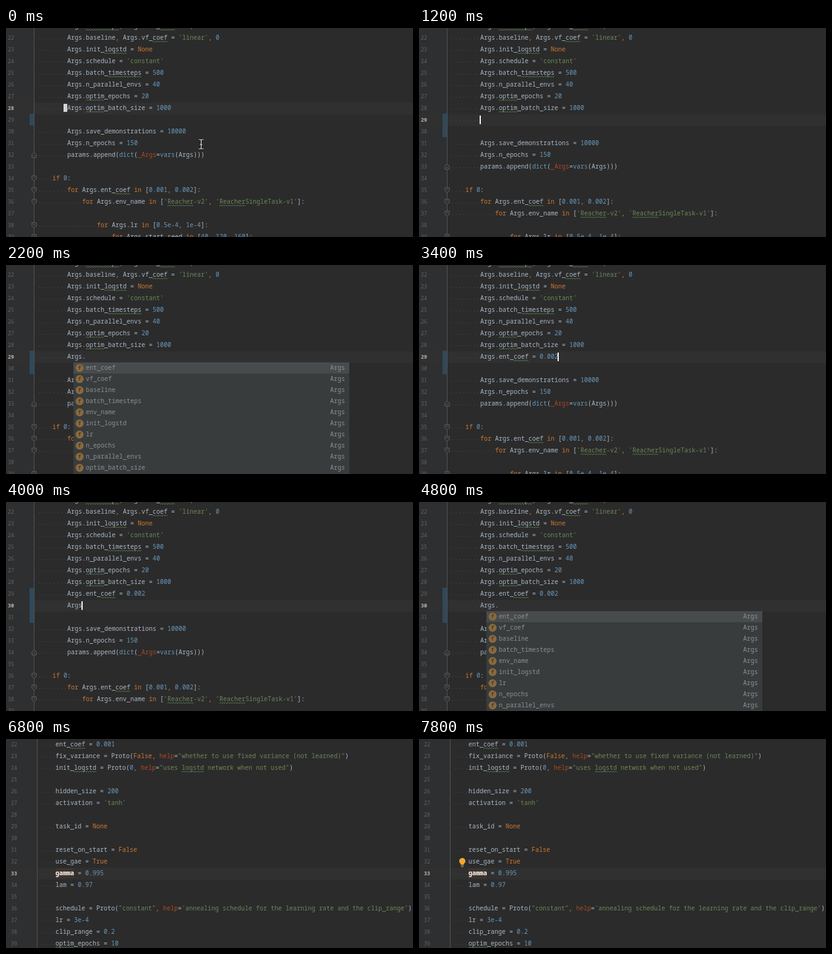
These frames come from a looping animation (658 by 339 pixels, 8000 ms). An HTML page:

```html
<!DOCTYPE html>
<html lang="en">
<head>
<meta charset="utf-8">
<title>Code editor</title>
<style>
  html, body { margin: 0; width: 100%; height: 100%; overflow: hidden; background: #2b2b2b; }
  svg { display: block; width: 658px; height: 339px; }
  text { font: 500 10px "Noto Sans Mono", "DejaVu Sans Mono", monospace; white-space: pre; fill: #a9b7c6; }
  .num { font-size: 8.4px; fill: #606366; }
  .num.on { fill: #b4b4b4; font-weight: 700; }
  .kw { fill: #cc7832; }
  .lit { fill: #6897bb; }
  .str { fill: #6a8759; }
  .arg { fill: #aa4926; }
  .hot { fill: #fff; font-weight: 700; }
  .item { fill: #8b9094; }
  .icon { font-size: 9px; fill: #2d2a26; }
  .wave { fill: none; stroke: #587c50; stroke-width: .9; }
  .dots { stroke: #505050; stroke-dasharray: 1 5; }
  .fold { fill: #2b2b2b; stroke: #66696b; stroke-width: .9; }
</style>
</head>
<body>
<svg id="stage" viewBox="0 0 658 339"></svg>
<script>
const CHAR = 6, ROW = 19, LOOP = 8000;
const stage = document.getElementById('stage');

// Leading spaces give the indentation
const config = [
  '        Args.timesteps, Args.ent_coef = 0, 0',
  "        Args.baseline, Args.vf_coef = 'linear', 0",
  '        Args.init_logstd = None',
  "        Args.schedule = 'constant'",
  '        Args.batch_timesteps = 500',
  '        Args.n_parallel_envs = 40',
  '        Args.optim_epochs = 20',
  '        Args.optim_batch_size = 1000'
];
const rest = [
  '',
  '        Args.save_demonstrations = 10000',
  '        Args.n_epochs = 150',
  '        params.append(dict(_Args=vars(Args)))',
  '',
  '    if 0:',
  '        for Args.ent_coef in [0.001, 0.002]:',
  "            for Args.env_name in ['Reacher-v2', 'ReacherSingleTask-v1']:",
  '',
  '                for Args.lr in [0.5e-4, 1e-4]:',
  '                    for Args.start_seed in [40, 120, 160]:'
];
const defaults = [
  '    ent_coef = 0.001',
  '    fix_variance = Proto(False, help="whether to use fixed variance (not learned)")',
  '    init_logstd = Proto(0, help="uses logstd network when not used")',
  '',
  '    hidden_size = 200',
  "    activation = 'tanh'",
  '',
  '    task_id = None',
  '',
  '    reset_on_start = False',
  '    use_gae = True',
  '    gamma = 0.995',
  '    lam = 0.97',
  '',
  '    schedule = Proto("constant", help=\'annealing schedule for the learning rate and the clip_range\')',
  '    lr = 3e-4',
  '    clip_range = 0.2',
  '    optim_epochs = 10'
];
const fields = ['ent_coef', 'vf_coef', 'baseline', 'batch_timesteps', 'env_name', 'init_logstd',
  'lr', 'n_epochs', 'n_parallel_envs', 'optim_batch_size', 'gamma'];

// [start ms, line being typed (0 = before, 3 = other file), its text, options]
const steps = [
  [0, 0, '', { mouse: 1 }],
  [600, 1, '', { caret: 1 }],
  [1400, 1, 'A', { caret: 1 }],
  [1600, 1, 'Args', { caret: 1 }],
  [1800, 1, 'Args.', { caret: 1, popup: 1 }],
  [2000, 1, 'Args.', { popup: 1 }],
  [2400, 1, 'Args.e', { caret: 1, popup: 1 }],
  [2600, 1, 'Args.ent', { caret: 1, popup: 1 }],
  [2800, 1, 'Args.ent_coef', { caret: 1 }],
  [3000, 1, 'Args.ent_coef = ', { caret: 1 }],
  [3200, 1, 'Args.ent_coef = 0.0', { caret: 1 }],
  [3400, 1, 'Args.ent_coef = 0.002', { caret: 1 }],
  [3800, 2, '', { caret: 1 }],
  [4000, 2, 'Args', { caret: 1 }],
  [4200, 2, 'Args.', { caret: 1, popup: 1 }],
  [4600, 2, 'Args.', { popup: 1 }],
  [5000, 2, 'Args.g', { caret: 1, popup: 1 }],
  [5200, 2, 'Args.gam', { caret: 1, popup: 1 }],
  [5600, 2, 'Args.gamma', { caret: 1 }],
  [5800, 2, 'Args.gamma', { caret: 1, flash: 1 }],
  [6200, 3, '', {}],
  [7000, 3, '', { bulb: 1 }]
];

const rect = (x, y, w, h, fill) => `<rect x="${x}" y="${y}" width="${w}" height="${h}" fill="${fill}"/>`;
const label = (x, y, s, cls = '') => `<text x="${x}" y="${y}" class="${cls}">${s}</text>`;

const token = /('[^']*'|"[^"]*")|\b(for|in|if|None|True|False)\b|(,)|\b(dict|vars|\d[\d.]*(?:e-\d+)?)\b|(\w+)(?==)/g;
function paint(code) {
  return code.replace(token, (s, str, kw, comma, lit) => {
    const cls = str ? 'str' : kw || comma ? 'kw' : lit ? 'lit' : 'arg';
    return `<tspan class="${cls}">${s}</tspan>`;
  });
}

function wave(x, y, width) {
  let d = `M${x} ${y + 2}`;
  for (let i = 2; i <= width; i += 2) d += `L${x + i} ${y + (i % 4 ? 0 : 2)}`;
  return `<path class="wave" d="${d}"/>`;
}

function codeLine(code, left, mid, hot) {
  const body = code.trimStart(), indent = code.length - body.length;
  const x = left + indent * CHAR;
  let out = '';
  if (indent) out += `<path class="dots" d="M${left + 2.5} ${mid + 1.5}H${x}"/>`;
  const html = hot ? paint(body).replace('gamma', '<tspan class="hot">gamma</tspan>') : paint(body);
  out += label(x, mid + 3, html);
  for (const m of body.matchAll(/coef|logstd|timesteps|optim|Reacher/g))
    out += wave(x + m.index * CHAR, mid + 5, m[0].length * CHAR);
  return out;
}

function fold(mid, up) {
  const k = up ? -1 : 1;
  return `<path class="fold" d="M42 ${mid - 4 * k}h7v${5 * k}l-3.5 ${3 * k}l-3.5 ${-3 * k}zM44 ${mid - k}h3"/>`;
}

function popup(y, prefix) {
  const list = fields.filter(f => f.startsWith(prefix)).slice(0, 10);
  let out = rect(109, y, 446, list.length * 18 + 1, '#383c3d') + rect(109, y, 446, 18, '#484b4d');
  list.forEach((name, i) => {
    const mid = y + 9 + i * 18;
    out += `<circle cx="119" cy="${mid}" r="6.5" fill="#896a3e"/>` + label(116.3, mid + 3, 'f', 'icon') +
      label(129, mid + 3, name, 'item') + label(524, mid + 3, 'Args', 'item');
  });
  return out;
}

const mouse = '<g fill="none"><path id="beam" d="M311.5 181h3l1 1l1-1h3M315.500 182v13M311.500 196h3l1-1l1 1h3M313.500 189h4" ' +
  'stroke="#111" stroke-width="3"/><path d="M311.500 181h3l1 1l1-1h3M315.500 182v13M311.500 196h3l1-1l1 1h3M313.500 189h4" ' +
  'stroke="#eee" stroke-width="1.200"/></g>';
const bulb = '<circle cx="70" cy="198" r="5" fill="#f0a732"/><path d="M67.500 201h5v3h-5z" fill="#f0a732"/>' +
  '<path d="M67.500 205.500h5M68.500 207.500h3" stroke="#a0a0a0"/>';

function draw([, phase, typed, opt]) {
  const other = phase === 3;
  const lines = other ? defaults : [...config];
  if (phase === 1 || phase === 2) {
    if (phase === 2) lines.push('        Args.ent_coef = 0.002');
    lines.push('        ' + typed);
  }
  if (!other) lines.push(...rest);

  const first = other ? 22 : 21, top = other ? 9 : -3;
  const left = other ? 56 : 51, edge = other ? 50 : 45;
  const active = other ? 33 : 28 + phase;
  const now = top + (active - first) * ROW;

  let out = rect(0, 0, 658, 339, '#2b2b2b') + rect(0, 0, edge, 339, '#2e2f30') +
    rect(0, now - 9, 658, ROW, '#303030');
  if (!other) out += rect(38, 139, 7, ROW * (phase + 1), '#30485a');
  out += rect(edge, 0, 1, 339, '#515355');
  if (other) out += rect(80, now - 8, 30, 16, '#40332b');
  if (opt.flash) out += rect(99, now - 9, 48, ROW, '#48573a');

  lines.forEach((code, i) => {
    const mid = top + i * ROW, n = first + i;
    out += label(edge - 42, mid + 3, n, n === active ? 'num on' : 'num');
    out += codeLine(code, left, mid, other && n === active);
    if (!other && /params|if 0|for /.test(code)) out += fold(mid, code.includes('params'));
  });

  if (phase === 0) out += rect(93, now - 7, 6, 13, '#d4d4d4');
  if (opt.caret) out += rect(98 + typed.length * CHAR, now - 7, 2, 14, '#f0f0f0');
  if (opt.popup) out += popup(now + 9, typed.split('.')[1]);
  if (opt.mouse) out += mouse;
  if (opt.bulb) out += bulb;
  stage.innerHTML = out;
}

let shown;
function tick() {
  const t = performance.now() % LOOP;
  const step = steps.findLast(s => s[0] <= t);
  if (step !== shown) draw(shown = step);
  requestAnimationFrame(tick);
}
tick();
</script>
</body>
</html>
```
